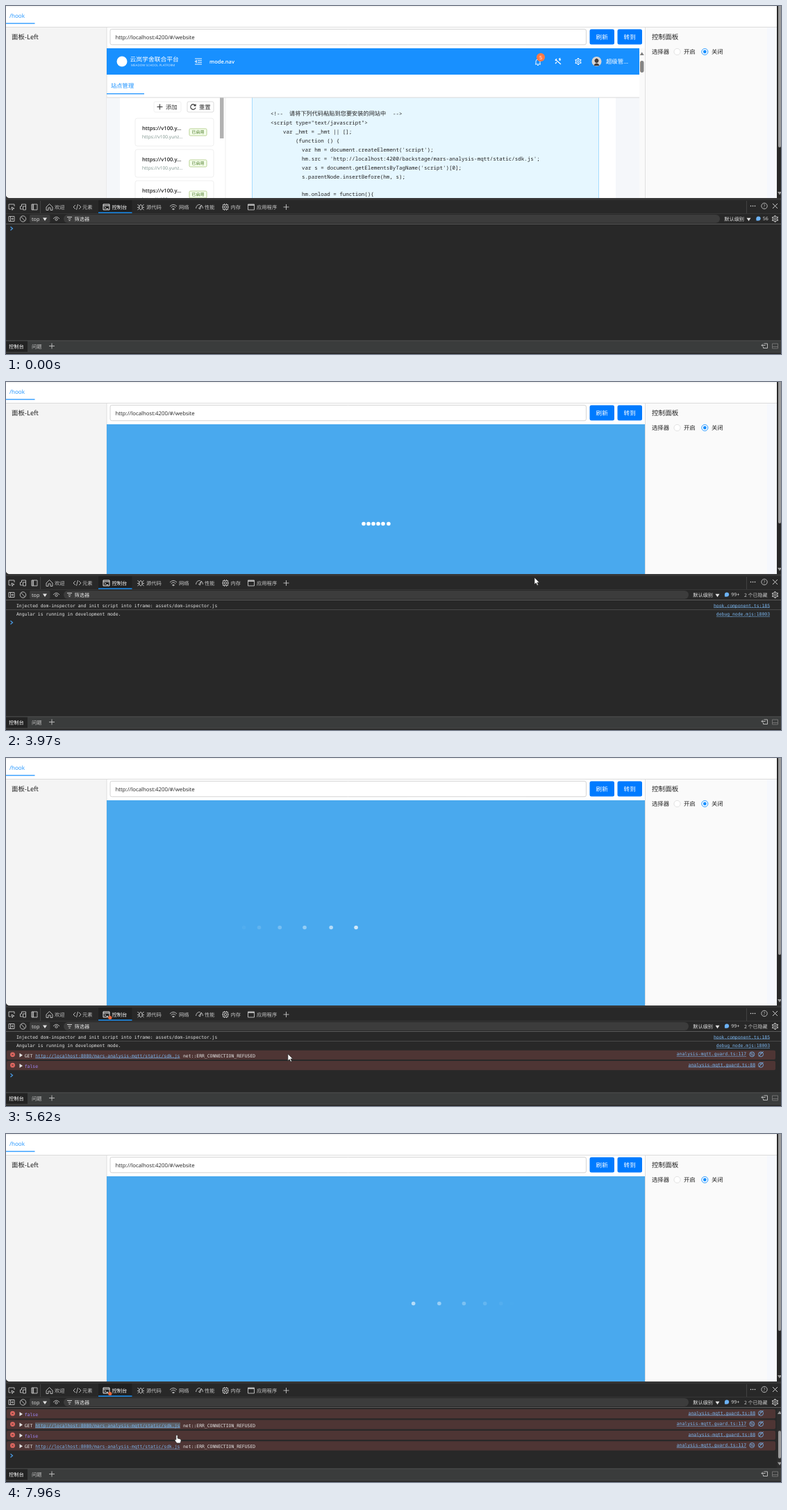
An HTML page with a canvas that plays this animation: 1116 by 502 pixels, repeating every 8000 ms.

```html
<!DOCTYPE html>
<html lang="zh">
<head>
<meta charset="utf-8">
<style>
html, body { margin: 0; width: 100%; height: 100%; overflow: hidden; background: #282828; }
canvas { display: block; }
</style>
</head>
<body>
<canvas id="stage" width="1116" height="502"></canvas>
<script>
const ctx = document.getElementById('stage').getContext('2d');
const LOOP = 8000, BLUE = '#1890ff', LIGHT = '#e3e3e3', GREY = '#c7c7c7', LINK = '#7cb7f0';
const UI = '"Open Sans","Noto Sans CJK SC","Noto Sans CJK",sans-serif';
const CJK = '"Noto Sans CJK SC","Noto Sans CJK",sans-serif';
const MONO = '"DejaVu Sans Mono",monospace';
const CODE = '"Noto Sans Mono","Noto Sans CJK SC",monospace';
ctx.textRendering = 'geometricPrecision';

// y is the visual middle of the line; returns the text width
function text(s, x, y, size, color, { font = UI, weight = 400, align = 'left' } = {}) {
  ctx.font = `${weight} ${size}px ${font}`;
  ctx.textAlign = align;
  ctx.fillStyle = color;
  ctx.fillText(s, x, y + size * 0.36);
  return ctx.measureText(s).width;
}
function rect(x, y, w, h, fill, r = 0, stroke) {
  ctx.beginPath();
  ctx.roundRect(x, y, w, h, r);
  if (fill) { ctx.fillStyle = fill; ctx.fill(); }
  if (stroke) { ctx.strokeStyle = stroke; ctx.lineWidth = 0.8; ctx.stroke(); }
}
function circle(x, y, r, fill, stroke, width = 0.9) {
  ctx.beginPath();
  ctx.arc(x, y, r, 0, 7);
  if (fill) { ctx.fillStyle = fill; ctx.fill(); }
  if (stroke) { ctx.strokeStyle = stroke; ctx.lineWidth = width; ctx.stroke(); }
}
function icon(d, x, y, stroke, fill, width = 0.9) {
  const p = new Path2D(d);
  ctx.save();
  ctx.translate(x, y);
  if (fill) { ctx.fillStyle = fill; ctx.fill(p); }
  if (stroke) { ctx.strokeStyle = stroke; ctx.lineWidth = width; ctx.stroke(p); }
  ctx.restore();
}
function gear(x, y, color) {
  circle(x, y, 1.5, null, color);
  circle(x, y, 3.6, null, color);
  for (let a = 0; a < 6; a++) {
    const c = Math.cos(a * Math.PI / 3 + 0.5), s = Math.sin(a * Math.PI / 3 + 0.5);
    icon(`M${c * 3.6} ${s * 3.6}L${c * 5} ${s * 5}`, x, y, color, null, 1.6);
  }
}
const ARROW_DOWN = 'M-3-2H3L0 2.5Z', ARROW_UP = 'M-3 2H3L0-2.5Z', PLUS = 'M-4 0H4M0-4V4', PROMPT = 'M-1.5-2.5L1.5 0-1.5 2.5';

// Linear walk through [time, ...values] points
function along(points, t) {
  const i = points.findIndex(p => p[0] > t);
  if (i < 0) return points.at(-1).slice(1);
  if (i === 0) return points[0].slice(1);
  const a = points[i - 1], b = points[i], k = (t - a[0]) / (b[0] - a[0]);
  return a.slice(1).map((v, j) => v + (b[j + 1] - v) * k);
}
// cubic-bezier(.42, 0, .58, 1)
function easeInOut(x) {
  let lo = 0, hi = 1;
  for (let i = 0; i < 20; i++) {
    const m = (lo + hi) / 2, n = 1 - m;
    if (1.26 * m * n * n + 1.74 * m * m * n + m * m * m < x) lo = m; else hi = m;
  }
  return lo * lo * (3 - 2 * lo);
}

const DRAG = [[4390, 0], [4860, 77], [5130, 80]];
const POINTER = [
  [190, 1040, 468], [450, 930, 330], [730, 791, 130], [960, 849, 41], [1030, 852, 37],
  [1580, 852, 37], [1920, 815, 64], [2130, 815, 64], [2390, 792, 97], [2930, 870, 184],
  [3410, 891, 190], [3550, 889, 188], [3970, 761, 282], [4250, 744, 280], [4390, 744, 280],
  [4860, 744, 357], [5130, 744, 360], [5200, 735, 364], [5600, 420, 425], [5950, 185, 455],
  [6080, 174, 452], [6400, 176, 456], [6860, 225, 455], [7200, 246, 434]
];
const ERRORS = [5200, 5270, 5950, 6020, 7900];

function siteHeader() {
  rect(145, 61, 767, 38, BLUE);
  circle(167, 80, 7.5, '#fff');
  text('云岚学舍联合平台', 178.5, 77, 8.8, '#fff', { weight: 500 });
  text('MEADOW SCHOOL PLATFORM', 180, 85.5, 4.5, '#d9edff');
  icon('M-5-4H5M-1-1.3H5M-1 1.3H5M-5 4H5M-5 0L-2.5-1.7V1.7Z', 277, 80, '#fff');
  text('mode.nav', 293, 80, 7.5, '#fff', { weight: 600 });
  icon('M-4 3H4M-3 3V-1Q-3-4 0-4Q3-4 3-1V3M-1 4.5H1M0-4V-5', 766, 81, '#fff');
  circle(770, 74, 6, '#ff7a45');
  text('5', 770, 74, 7, '#fff', { align: 'center' });
  icon('M-4-3L4 4M-4-1L-2-4M1-4L4-2M3-5L2-1M-4 3L-2 1', 795, 80, '#fff', null, 1.2);
  gear(824, 80, '#fff');
  circle(850.5, 80, 7, '#d9d5d2');
  icon('M-4 5Q0 0 4 5L3 6.2H-3ZM-3-2Q0-7 3-2Q3 2 0 2Q-3 2-3-2Z', 850.5, 80, null, '#403b3c');
  text('超级管...', 864, 80, 8.4, '#fff', { font: CJK, weight: 500 });
}

function siteList() {
  rect(164, 132, 714, 145, '#fff');
  rect(315.5, 132, 1, 145, '#f0f0f0');
  rect(308, 132, 5.5, 59, '#b2b2b2');
  rect(213, 138, 39, 15, '#fff', 2, '#ececec');
  icon(PLUS, 221.5, 145.5, '#333', null, 1.1);
  text('添加', 230, 145.5, 8.4, '#333');
  rect(261, 138, 38, 15, '#fff', 2, '#d4d4d4');
  icon('M3-2A3.7 3.7 0 1 0 3.5 1.2M3.6-4V-1.6H1', 269.5, 145.5, '#333', null, 1.1);
  text('重置', 278, 145.5, 8.4, '#333');
  for (let y = 162; y < 277; y += 45) {
    rect(186, y, 113, 40, '#fff', 3, '#ebebeb');
    text('https://v100.y...', 196, y + 14, 7.6, '#222', { weight: 600 });
    text('https://v100.yunz...', 196, y + 27, 6.6, '#7b918b');
    rect(264, y + 15, 25, 10, '#f6ffed', 1.5, '#a9c77c');
    text('已启用', 276.5, y + 20, 6.1, '#46781f', { align: 'center' });
  }
}

function siteCode() {
  rect(354.5, 120, 499, 170, '#e6f7ff', 0, '#91d5ff');
  const opt = { font: CODE }, ink = '#222';
  text('<\x21--', 381, 155.5, 7.52, ink, opt);
  text('请将下列代码粘贴到您要安装的网站中', 408, 155.5, 8.2, ink, opt);
  text('--\x3e', 557, 155.5, 7.52, ink, opt);
  [
    [0, '<\x73cript type="text/javascript">'],
    [4, 'var _hmt = _hmt || [];'],
    [8, '(function () {'],
    [10, "var hm = document.createElement('script');"],
    [10, "hm.src = 'http://localhost:4200/backstage/mars-analysis-mqtt/static/sdk.js';"],
    [10, "var s = document.getElementsByTagName('script')[0];"],
    [10, 's.parentNode.insertBefore(hm, s);'],
    [0, ''],
    [10, 'hm.onload = function(){']
  ].forEach(([indent, s], i) => text(s, 381 + indent * 4.51, 168.4 + i * 12.9, 7.52, ink, opt));
}

function site() {
  rect(145, 132, 767, 145, '#f5f7fa');
  ctx.save();
  ctx.beginPath();
  ctx.rect(145, 132, 767, 145);
  ctx.clip();
  siteList();
  siteCode();
  ctx.restore();
  siteHeader();
  text('站点管理', 151, 115.5, 8.3, BLUE, { weight: 500 });
  rect(145, 126, 54, 1.2, BLUE);
  rect(145, 131.5, 767, 1, '#d9d9d9');
  rect(912, 61, 8, 216, '#fafafa');
  icon(ARROW_UP, 915.7, 69, null, '#7d7d7d');
  rect(913, 79, 5.5, 17, '#858585', 2.7);
}

function loader(t, bottom) {
  rect(145, 61, 775, bottom - 61, '#49a9ee');
  const clock = 488 + (t - 2390) * 0.9767;
  for (let i = 0; i < 6; i++) {
    const local = clock - (5 - i) * 100;
    if (local < 0) continue;
    const p = local % 3000 / 3000;
    let dx = 0, alpha = 1;
    if (p < 0.33) { alpha = easeInOut(p / 0.33); dx = -180 * (1 - alpha); }
    else if (p > 0.66) { const k = easeInOut((p - 0.66) / 0.34); alpha = 1 - k; dx = 180 * k; }
    circle(515 + 7 * i + dx, 35.5 + (bottom + 61) / 2, 2.8, `rgba(255,255,255,${alpha})`);
  }
}

function page(t, bottom) {
  ctx.save();
  ctx.beginPath();
  ctx.roundRect(0, -10, 1110, bottom + 10, [0, 0, 0, 5]);
  ctx.clip();
  rect(0, 0, 1110, bottom, '#fff');
  rect(0, 0, 1110, 1.5, '#f3f3f3');
  text('/hook', 5, 14.5, 8.1, BLUE);
  rect(0, 24.5, 41.5, 1.3, BLUE);
  rect(0, 31, 145, bottom, '#f4f4f4');
  rect(920, 31, 190, bottom, '#fafafa');
  rect(1096, 31, 14, bottom, '#f6f8fd');
  rect(0, 30, 1110, 1, '#dcdcdc');
  rect(144.6, 31, 0.9, bottom, '#dcdcdc');
  rect(920, 31, 0.9, bottom, '#dcdcdc');
  text('面板-Left', 8, 45, 9.4, '#222', { font: CJK, weight: 500 });
  text('控制面板', 930, 45, 9.6, '#222', { weight: 500 });
  text('选择器', 930, 66, 8.4, '#222');
  circle(966.5, 66, 4.6, '#fff', '#dedede');
  text('开启', 976, 66, 8.4, '#222');
  circle(1006.3, 66, 4.5, '#fff', BLUE);
  circle(1006.3, 66, 2.4, BLUE);
  text('关闭', 1016, 66, 8.4, '#222');
  rect(150, 33.4, 685.5, 22.4, '#fff', 2.5, '#c9c9c9');
  text('http://localhost:4200/#/website', 157.5, 44.7, 7.8, '#222');
  for (const [label, x] of [['刷新', 840.5], ['转到', 880.5]]) {
    rect(x, 33.5, 35.5, 22, '#007bff', 2.5);
    text(label, x + 17.7, 44.5, 8.6, '#fff', { align: 'center', weight: 500 });
  }
  if (t < 1440) site();
  else if (t >= 1850) loader(t, bottom);
  ctx.restore();
  rect(1112, 0, 4, bottom - 73, '#9b9b9b', [0, 0, 2, 2]);
  icon(ARROW_DOWN, 1114, bottom - 7, null, '#9b9b9b');
}

function toolbar(y, failed) {
  const I = (d, x, c = GREY) => icon(d, x, y, c);
  I('M-1 3H-4V-4H4V-1M0 0L4 2 2 2.5 1 4.5Z', 8);
  I('M-1 3H-4V-1H-2V-4H4V-1M0-1H4V4H0Z', 24.5);
  I('M-4-4H4V4H-4ZM-1.5-4V4M-3-4V4', 41);
  rect(49, y - 9, 0.8, 18, '#484848');
  I('M-4.5 0L0-4.5 4.5 0V4.5H1.5V1H-1.5V4.5H-4.5Z', 62.5);
  I('M-2.5-3L-5.5 0-2.5 3M2.5-3L5.5 0 2.5 3M1-4L-1 4', 102.5);
  rect(133, y - 10, 48.5, 19, '#202020');
  I('M-4.5-4H4.5V4H-4.5ZM-4.5-2H4.5M-2.5-.5L-1 1-2.5 2.5M0 2.5H2.5', 144.5, '#fff');
  if (failed) circle(149.8, y + 4.5, 2.6, '#e9683c');
  rect(133, y + 7.3, 48.5, 1.6, '#1a7fd4');
  I('M-2-1Q0-6 2-1V2Q0 6-2 2ZM-4.5-4L-2-1M4.5-4L2-1M-4.5 4L-2 2M4.5 4L2 2M-5 .5H-2M5 .5H2', 194);
  I('M-5-1Q0-6 5-1M-3.3 1Q0-2.5 3.3 1M-1.5 3Q0 1.5 1.5 3L0 4Z', 241);
  I('M-5 2Q-4-4 1-3.5M3-2.5Q5-1 5 2M-1 2L3-3 1 3Z', 278.5);
  I('M-3.5-3.5H3.5V3.5H-3.5ZM-1.5-1.5H1.5V1.5H-1.5ZM-1.5-5V-3.5M1.5-5V-3.5M-1.5 5V3.5M1.5 5V3.5M-5 0H-3.5M5 0H3.5', 316);
  I('M-4.5-4H4.5V4H-4.5ZM-4.5-2.5H4.5M-4.5-3.3H4.5', 353);
  I(PLUS, 403.5);
  [['欢迎', 70], ['元素', 110], ['控制台', 152.5], ['源代码', 202], ['网络', 249], ['性能', 286], ['内存', 323.5], ['应用程序', 361]]
    .forEach(([s, x], i) => text(s, x, y, 7.3, i === 2 ? '#fff' : GREY));
  rect(1066, y - 9, 0.8, 18, '#484848');
  for (let x = 1072.5; x < 1080; x += 3) circle(x, y - 1.5, 0.8, LIGHT);
  circle(1092, y - 1.5, 4.2, null, GREY);
  text('?', 1092, y - 1.5, 6.5, GREY, { align: 'center' });
  icon('M-3.5-3.5L3.5 3.5M3.5-3.5L-3.5 3.5', 1107.5, y - 1.5, LIGHT);
}

function filterBar(y, hidden) {
  icon('M-4-3.5H4V3.5H-4ZM-1.5-3.5V3.5M3 0H0L1.5-1.5M0 0L1.5 1.5', 8, y, GREY);
  circle(24.5, y, 4.2, null, GREY);
  icon('M-3-3L3 3', 24.5, y, GREY);
  rect(34, y - 6, 29.5, 12, '#3b3b3b', 2);
  text('top', 37, y, 7.2, LIGHT);
  icon(ARROW_DOWN, 56, y + 0.5, null, LIGHT);
  icon('M-4.5 0Q0-5.5 4.5 0', 72.5, y, GREY);
  circle(72.5, y + 0.8, 1.6, null, GREY);
  const end = hidden ? 983 : 1028;
  rect(83, y - 6, end - 83, 12, '#3c3c3c', 6);
  icon('M-3.5-2.5H3.5M-2 0H2M-1 2.5H1', 91.5, y, LIGHT);
  text('筛选器', 98.5, y, 7.2, LIGHT);
  text('默认级别', end + 6.3, y, 7.2, LIGHT);
  icon(ARROW_DOWN, end + 41.5, y + 0.7, null, LIGHT);
  const bx = hidden ? 1038 : 1083.5;
  circle(bx, y - 0.5, 3.1, '#6cb2f5');
  rect(bx - 3.1, y - 0.5, 3, 3.1, '#6cb2f5');
  text(hidden ? '99+' : '56', bx + 6.3, y - 0.5, 7, LIGHT);
  if (hidden) text(hidden + ' 个已隐藏', 1063, y, 7, GREY, { font: CJK });
  gear(1107.5, y, GREY);
}

function link(s, x, y, align) {
  const w = text(s, x, y, 6.42, LINK, { font: MONO, align });
  rect(align === 'right' ? x - w : x, y + 3.2, w, 0.6, LINK);
}

function errorRow(i, y, hovered) {
  const opt = { font: MONO }, get = i % 2 === 0;
  rect(1, y - 7.7, 1107, 13.2, '#4e3534', 2);
  circle(9.5, y - 1.6, 3.4, '#e46962');
  icon('M-1.2-1.2L1.2 1.2M1.2-1.2L-1.2 1.2', 9.5, y - 1.6, '#4e3534');
  icon('M-2-3L2.5 0-2 3Z', 21.5, y - 0.7, null, LIGHT);
  if (get) {
    text('GET', 26.7, y, 6.42, LIGHT, opt);
    if (hovered) rect(42, y - 4, 209, 8.5, '#5d6168');
    link('http://localhost:8080/mars-analysis-mqtt/static/sdk.js', 42.2, y);
    text('net::ERR_CONNECTION_REFUSED', 255, y, 6.42, LIGHT, opt);
    circle(1074.3, y - 2, 3.5, null, LINK, 0.8);
    icon('M-1 2V-2L-2-.5M1-2V2L2 .5', 1074.3, y - 2, LINK, null, 0.7);
  } else text('false', 26.7, y, 6.42, '#9b86f5', opt);
  link('analysis-mqtt.guard.ts:' + (get ? 117 : 88), get ? 1066 : 1079, y - 2.4, 'right');
  circle(1087, y - 2, 3.5, null, LINK, 0.8);
  icon('M-3 3L3.5-4M-1.5-1.5H1', 1087, y - 2, LINK, null, 0.9);
}

function log(t, shift, messages, errors) {
  const top = 315 + shift, opt = { font: MONO };
  const end = 321 + shift + 13 * messages + 15.4 * errors;
  const scroll = Math.max(0, end - 464), prompt = end - scroll;
  ctx.save();
  ctx.beginPath();
  ctx.rect(0, top, 1116, 482 - top);
  ctx.clip();
  [
    ['Injected dom-inspector and init script into iframe: assets/dom-inspector.js', 'hook.component.ts:185'],
    ['Angular is running in development mode.', 'debug_node.mjs:18003']
  ].slice(0, messages).forEach(([s, from], i) => {
    const y = 322.2 + shift + 12.5 * i - scroll;
    text(s, 15, y, 6.42, LIGHT, opt);
    link(from, 1100, y, 'right');
    if (i === 0) rect(0, y + 5.8, 1116, 0.8, '#555');
  });
  for (let i = 0; i < errors; i++) errorRow(i, prompt - 13 - 15.4 * (errors - 1 - i), i === 2 && t > 7050);
  icon(PROMPT, 8, prompt, '#4a9de8', null, 1.2);
  if (scroll) {
    rect(1110, top + 1, 6, 90, '#2d2d2d');
    icon(ARROW_UP, 1114, 402, null, '#9b9b9b');
    rect(1112, 398 + 6 * errors, 4, 70 - 6 * errors, '#9b9b9b', 2);
    icon(ARROW_DOWN, 1114, 475.5, null, '#9b9b9b');
  }
  ctx.restore();
}

function drawer() {
  rect(0, 482.5, 1116, 17, '#3a3c3c');
  rect(0, 482.5, 1116, 0.8, '#555');
  rect(0, 483.5, 31, 16, '#232323');
  rect(0, 499, 1116, 3, '#2b2b2b');
  rect(0, 499, 1116, 0.8, '#505050');
  text('控制台', 4, 491.5, 7.3, '#fff');
  text('问题', 37, 491.5, 7.3, GREY);
  icon(PLUS, 66, 490.5, GREY);
  icon('M-1-3.5H4V3H-2V1M-4.5-1H1M-2.5-3L-4.5-1-2.5 1', 1092.5, 490.5, GREY);
  icon('M-4-3.5H4V3.5H-4ZM-4 1H4', 1107.5, 490.5, '#777');
}

function pointer(t) {
  if (t < 190) return;
  const [x, y] = along(POINTER, t);
  const resizing = t >= 4250 && t < 5200;
  if (t >= 1310 && t < 1580 || t >= 4390 && t < 5130) circle(x, y + (resizing ? 1 : 0.5), 6.8, 'rgba(190,176,14,.8)');
  if (resizing) icon('M0-5L2.2-2.5H.6V2.5H2.2L0 5-2.2 2.5H-.6V-2.5H-2.2Z', x, y + 0.5, '#333', '#fff', 0.5);
  else if (t > 7050) icon('M-1.2 1Q0-1 1.2 1V5L5 6Q6.5 6.5 6 9L5 12H0L-3 8Q-3 6-1.2 7Z', x, y, '#222', '#fff', 0.7);
  else icon('M0 0V10L2.3 7.9 3.9 11.4 5.6 10.6 4 7.2H7.2Z', x, y, '#222', '#fff', 0.7);
}

function draw(now) {
  const t = now % LOOP, [shift] = along(DRAG, t), bottom = 277 + shift;
  const messages = t < 2860 ? 0 : t < 3620 ? 1 : 2;
  const errors = ERRORS.filter(e => t >= e).length;
  const hidden = t < 1720 ? 0 : t < 3620 ? 1 : 2;
  rect(0, 0, 1116, 502, '#282828');
  page(t, bottom);
  rect(0, bottom, 1116, 3, '#363636');
  toolbar(bottom + 13, errors);
  rect(0, bottom + 22, 1116, 0.8, '#3c3c3c');
  filterBar(bottom + 30, hidden);
  rect(0, bottom + 37, 1116, 0.9, '#5a5a5a');
  log(t, shift, messages, errors);
  drawer();
  pointer(t);
  requestAnimationFrame(draw);
}
requestAnimationFrame(draw);
</script>
</body>
</html>
```
